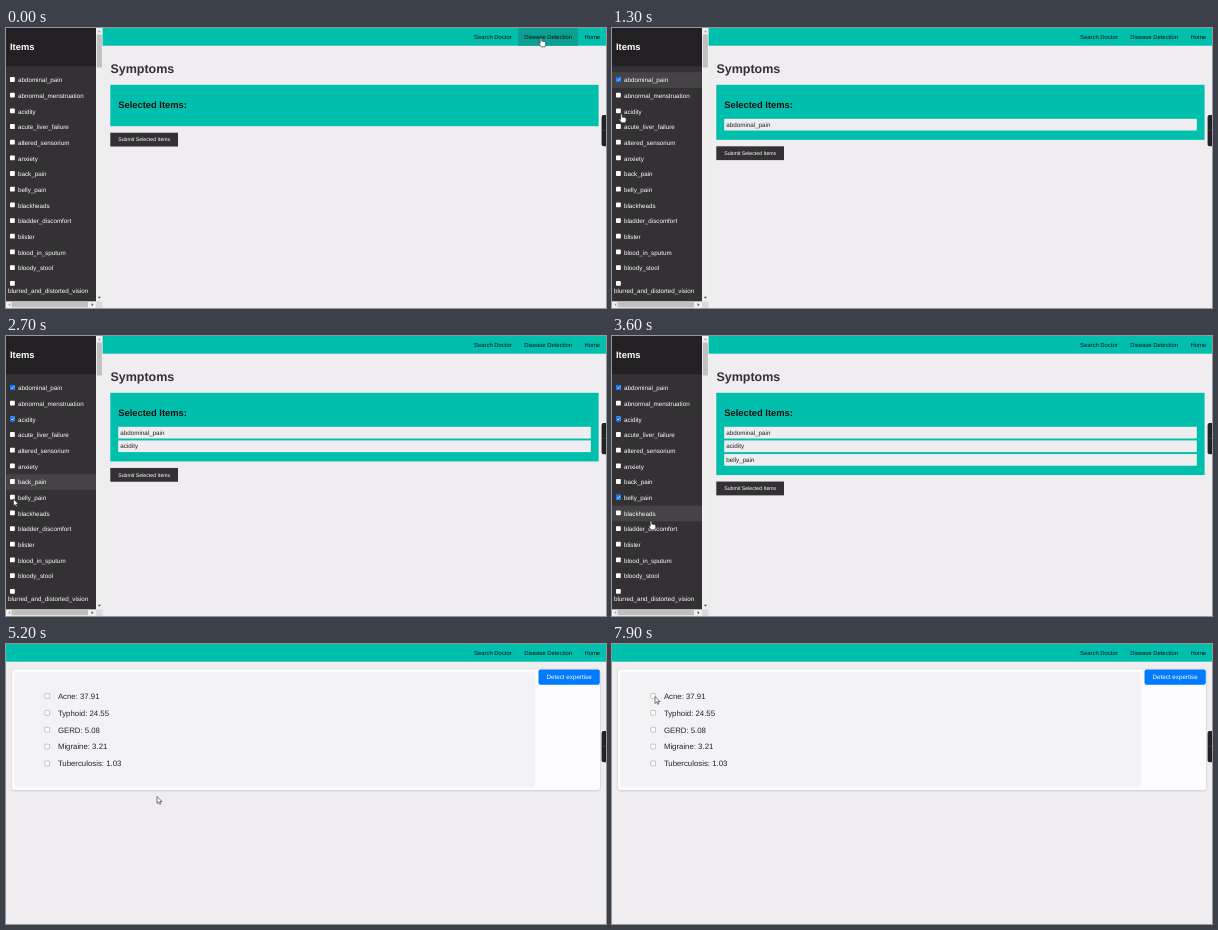
Recreate the animation shown at these times as an HTML page. Size 600 by 280 pixels, loop 8 s.

```html
<!DOCTYPE html>
<html lang="en">
<head>
<meta charset="utf-8">
<title>Symptom picker</title>
<style>
  html, body { margin: 0; width: 100%; height: 100%; overflow: hidden; background: #efedef; }
  svg { display: block; width: 600px; height: 280px; }
  text { font-family: "Liberation Sans", Arial, sans-serif; font-size: 6.25px; text-rendering: geometricPrecision; white-space: pre; }
  .title { font-size: 9.375px; font-weight: bold; }
  .heading { font-size: 12.5px; font-weight: bold; }
  .nav { font-size: 5.92px; }
  .button { font-size: 5.21px; text-anchor: middle; }
  .result { font-size: 7.81px; }
</style>
</head>
<body>
<svg id="stage" viewBox="0 0 600 280"></svg>
<script>
const LOOP = 8000, STEP = 100, PAGE_SWAP = 4800, HOVER_LAG = 200;
const TEAL = '#00bfad', DARK = '#333133';
const ROW_TOP = 44.2, ROW = 15.67, ENTRY = 13.62, RESULT = 16.85;

const symptoms = ['abdominal_pain', 'abnormal_menstruation', 'acidity', 'acute_liver_failure',
  'altered_sensorium', 'anxiety', 'back_pain', 'belly_pain', 'blackheads', 'bladder_discomfort',
  'blister', 'blood_in_sputum', 'bloody_stool'];
const results = ['Acne: 37.91', 'Typhoid: 24.55', 'GERD: 5.08', 'Migraine: 3.21', 'Tuberculosis: 1.03'];

// places where the pointer comes to rest, with the time of arrival
const stops = [
  { at: 0, x: 535, y: 10 }, { at: 900, x: 6, y: 51 }, { at: 1300, x: 9.5, y: 86 },
  { at: 2600, x: 7.5, y: 163 }, { at: 3400, x: 39, y: 185 }, { at: 3850, x: 6, y: 177 },
  { at: 4500, x: 140, y: 167 }, { at: 5200, x: 151, y: 152.5 }, { at: 5500, x: 112, y: 127 },
  { at: 6200, x: 43, y: 60 }, { at: 6900, x: 28, y: 68 }, { at: 7600, x: 43, y: 52.5 }];
const clicks = [1000, 2000, 2900, 3900];

const smooth = u => u * u * (3 - 2 * u);
const rowY = i => ROW_TOP + i * ROW;

// Rests at each stop, then eases to the next; longer ways take longer.
function pointerAt(t) {
  const next = stops.findIndex(s => s.at > t);
  if (next < 1) return stops[next < 0 ? stops.length - 1 : 0];
  const a = stops[next - 1], b = stops[next];
  const travel = Math.min(b.at - a.at, 200 + Math.hypot(b.x - a.x, b.y - a.y));
  const e = smooth(Math.max(0, 1 - (b.at - t) / travel));
  return { x: a.x + (b.x - a.x) * e, y: a.y + (b.y - a.y) * e };
}

function rowAt({ x, y }) {
  const i = Math.floor((y - ROW_TOP) / ROW);
  return x < 90 && i < symptoms.length ? i : -1;
}
const overNav = ({ x, y }) => x > 512 && x < 572 && y < 17.7;
const overSubmit = ({ x, y }, count) =>
  x > 104 && x < 172 && Math.abs(y - 111.6 - count * ENTRY) < 6.9;

const picks = clicks.map(at => ({ at, row: rowAt(pointerAt(at)) }));

const rect = (x, y, w, h, fill, more = '') =>
  `<rect x="${x}" y="${y}" width="${w}" height="${h}" fill="${fill}" ${more}/>`;
const text = (x, y, label, fill = '#222', kind = '') =>
  `<text x="${x}" y="${y}" fill="${fill}" class="${kind}">${label}</text>`;
const path = (d, fill, more = '') => `<path d="${d}" fill="${fill}" ${more}/>`;
const group = (id, content) => `<g id="${id}">${content}</g>`;
const box = (x, y, more = '') => rect(x, y, 4.8, 4.8, '#fff', 'rx=".7" ' + more);

function navBar() {
  return rect(0, 0, 600, 17.7, TEAL) +
    group('navHover', rect(512, 0, 60, 17.7, '#0ba091')) +
    text(468, 11.3, 'Search Doctor', '#111', 'nav') +
    text(518.2, 11.3, 'Disease Detection', '#111', 'nav') +
    text(578.4, 11.3, 'Home', '#111', 'nav');
}

function scrollBars() {
  return rect(90, 0, 6.6, 280, '#f1f0f1') + rect(0, 273.3, 90, 6.7, '#f1f0f1') +
    rect(90, 273.3, 6.6, 6.7, '#dcdbdc') +
    rect(90.8, 6.5, 5.1, 33, '#c1c0c1') + rect(5.6, 274, 76.4, 5.3, '#c1c0c1') +
    path('M91.8 4.2h3.2l-1.6-1.9z', '#a3a3a3') + path('M91.8 268.8h3.2l-1.6 1.9z', '#505050') +
    path('M4.2 275.1v3.2l-1.9-1.6z', '#a3a3a3') + path('M85.6 275.1v3.2l1.9-1.6z', '#505050');
}

function sideBar() {
  const rows = symptoms.map((name, i) =>
    box(4, rowY(i) + 4.9) + text(12, rowY(i) + 10.2, name, '#fff')).join('');
  const ticks = picks.map(({ row }, n) => group('tick' + n,
    rect(4, rowY(row) + 4.9, 4.8, 4.8, '#0075ff', 'rx=".7"') +
    path(`M5 ${rowY(row) + 7.3}l1.1 1.2 1.8-2.4`, 'none', 'stroke="#fff" stroke-width=".7"'))).join('');
  return rect(0, 0, 90, 274, DARK) + rect(0, 0, 90, 38.3, '#222022') +
    text(4, 22.2, 'Items', '#fff', 'title') +
    group('rowHover', rect(0, 0, 90, ROW, '#454345')) + rows + ticks +
    box(4, 253) + text(2, 265.4, 'blurred_and_distorted_vision', '#fff') + scrollBars();
}

function pickerPage() {
  const entries = picks.map(({ row }, n) => group('entry' + n,
    rect(112.2, 90.8 + n * ENTRY, 472.6, 11.7, '#efedef') +
    text(114.3, 98.7 + n * ENTRY, symptoms[row]))).join('');
  return text(104.4, 44.9, 'Symptoms', '#333133', 'heading') +
    rect(104.3, 56.8, 488.3, 0, TEAL, 'id="panel"') +
    text(112.2, 80.2, 'Selected Items:', '#111', 'title') + entries +
    group('submit', rect(104.3, 104.7, 67.7, 13.8, DARK, 'id="submitFill"') +
      text(138.2, 113.4, 'Submit Selected Items', '#fff', 'button')) +
    sideBar();
}

function resultPage() {
  const border = 'stroke="#767676" stroke-width=".4"';
  return rect(6, 25.6, 588, 120.4, '#fdfcfe', 'rx="3" filter="url(#shadow)"') +
    rect(8.2, 28.3, 521, 115, '#f3f2f4', 'rx="3"') +
    rect(532.5, 25.6, 61.3, 15.2, '#007bff', 'rx="2"') +
    text(540.5, 35.4, 'Detect expertise', '#fff') +
    results.map((label, i) => box(38.8, 49.6 + i * RESULT, border) +
      text(51.9, 54.8 + i * RESULT, label, '#212529', 'result')).join('');
}

const outline = 'stroke="#222" stroke-width=".6" stroke-linejoin="round"';
const pointer = group('arrow', path('M0 0V6.9L1.6 5.4 2.7 7.8 3.8 7.3 2.8 5H5Z', '#fff', outline)) +
  group('hand', path('M-.8 .6Q0-.5 .8 .6V3.3Q1.7 2.7 2.2 3.5 3.2 3 3.6 3.9 4.7 3.6 4.7 4.8V6.5L3.9 8.8H.2L-2.4 5.5Q-2.2 4.5-.8 5.4Z', '#fff', outline));

document.getElementById('stage').innerHTML =
  `<defs><filter id="shadow" x="-5%" y="-10%" width="110%" height="125%">
    <feDropShadow dx="0" dy=".6" stdDeviation="1" flood-opacity=".18"/></filter></defs>` +
  rect(0, 0, 600, 280, '#efedef') + navBar() +
  group('picker', pickerPage()) + group('result', resultPage()) +
  rect(595.6, 87, 8, 31.3, '#242224', 'rx="2"') + rect(597, 102.3, 3, .5, '#555') +
  group('pointer', pointer);

const $ = id => document.getElementById(id);
const set = (id, name, value) => $(id).setAttribute(name, value);
const show = (id, on) => set(id, 'visibility', on ? 'inherit' : 'hidden');

function draw(now) {
  const t = Math.floor(now % LOOP / STEP) * STEP;
  const picking = t < PAGE_SWAP;
  const count = clicks.filter(at => at <= t).length;
  const tip = pointerAt(t), lagged = pointerAt(Math.max(0, t - HOVER_LAG));
  const row = rowAt(lagged);

  show('picker', picking);
  show('result', !picking);
  show('navHover', overNav(lagged));
  show('rowHover', row >= 0);
  set('rowHover', 'transform', `translate(0 ${rowY(row)})`);
  clicks.forEach((at, n) => {
    show('tick' + n, t >= at);
    show('entry' + n, t >= at);
  });
  set('panel', 'height', 41.4 + count * ENTRY);
  set('submit', 'transform', `translate(0 ${count * ENTRY})`);
  set('submitFill', 'fill', overSubmit(tip, count) ? '#565456' : DARK);

  const overLabel = rowAt(tip) >= 0 && tip.x > 9;
  const hand = picking && (overNav(tip) || overLabel || overSubmit(tip, count));
  show('hand', hand);
  show('arrow', !hand);
  set('pointer', 'transform', `translate(${tip.x} ${tip.y})`);
}

const start = performance.now();
function frame() {
  draw(performance.now() - start);
  requestAnimationFrame(frame);
}
frame();
</script>
</body>
</html>
```
